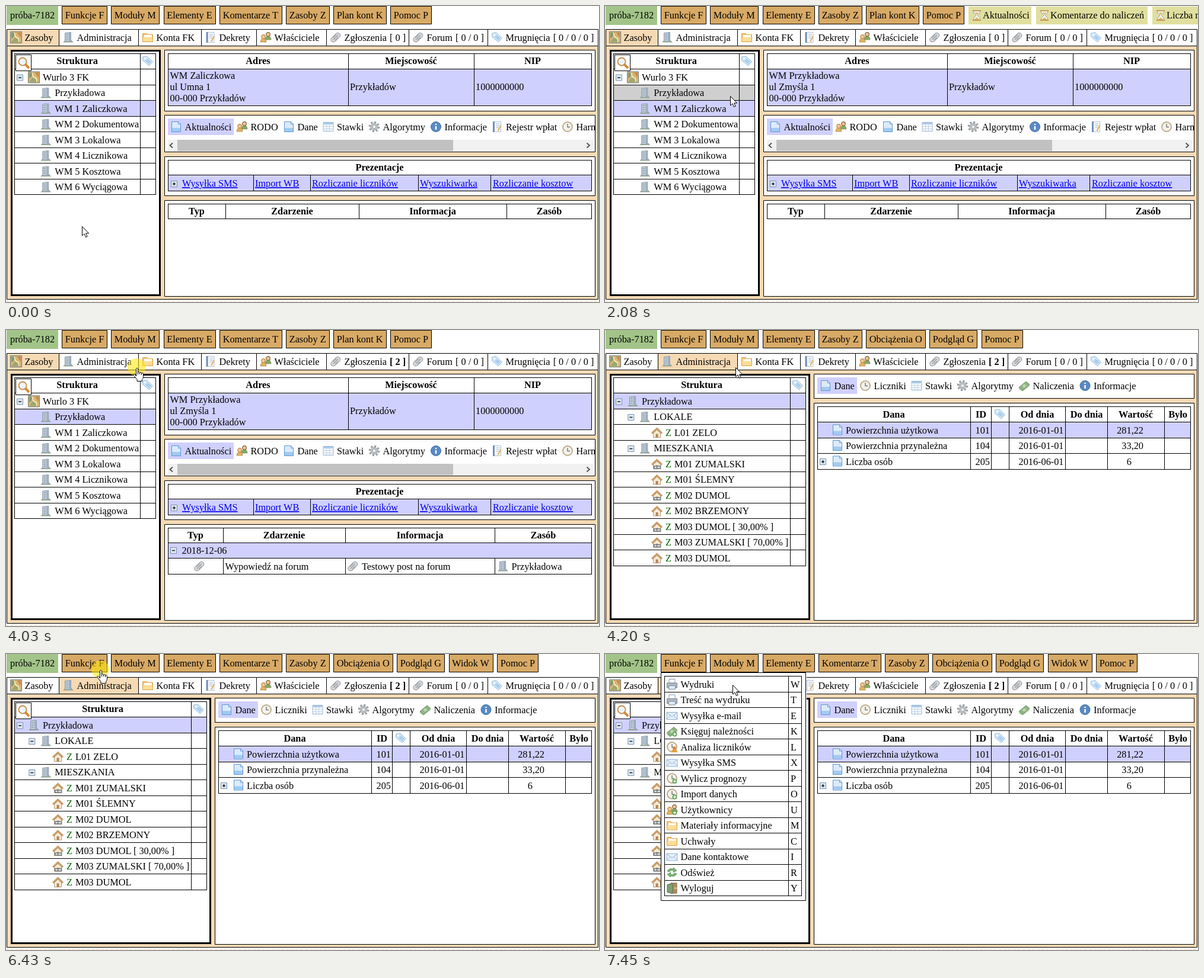
Animation, 1000 px wide and 500 px high, one loop 8 s. Source, as an HTML page:

```html
<!DOCTYPE html>
<html lang="pl">
<head>
<meta charset="utf-8">
<title>Panel</title>
<style>
  html, body { margin: 0; width: 100%; height: 100%; overflow: hidden; background: #fff; }
  svg { display: block; width: 1000px; height: 500px; }
  text { font: 16.3px "Liberation Serif", serif; fill: #000; }
  .b { font-weight: bold; }
  .m { text-anchor: middle; }
  .e { text-anchor: end; }
  .link { fill: #00e; text-decoration: underline; }
  .z { fill: #006400; }
</style>
</head>
<body>
<svg id="stage" viewBox="0 0 1000 500"></svg>
<script>
const LOOP = 8000, WHEAT = '#f5dab5', LILAC = '#d0d0ff', INK = '#000';

// Drawing helpers
const path = (d, fill = 'none', stroke = 'none', w = 1) =>
  `<path d="${d}" fill="${fill}" stroke="${stroke}" stroke-width="${w}"/>`;
const dot = (x, y, r, fill, stroke = 'none', w = 1) =>
  `<circle cx="${x}" cy="${y}" r="${r}" fill="${fill}" stroke="${stroke}" stroke-width="${w}"/>`;
const fillBox = (x0, y0, x1, y1, fill) => path(`M${x0} ${y0}H${x1}V${y1}H${x0}z`, fill);
const box = (x0, y0, x1, y1, fill = '#fff', w = 1) =>
  path(`M${x0 + w / 2} ${y0 + w / 2}H${x1 + 1 - w / 2}V${y1 + 1 - w / 2}H${x0 + w / 2}z`, fill, INK, w);
const text = (x, y, s, cls = '') => `<text x="${x}" y="${y}" class="${cls}">${s}</text>`;
const head = (x, y, s) => text(x, y, s, 'b m');
const place = (x, y, s) => `<g transform="translate(${x} ${y})">${s}</g>`;
const icon = (name, x, y) => place(x, y, icons[name]);
const grid = (xs, ys) => {
  const X = xs.map(v => Math.floor(v) + .5), Y = ys.map(v => Math.floor(v) + .5);
  const [l, r, t, b] = [X[0], X.at(-1), Y[0], Y.at(-1)];
  return path(Y.map(y => `M${l - .5} ${y}H${r + .5}`).join('') + X.map(x => `M${x} ${t}V${b}`).join(''), 'none', INK);
};
const rowTop = (i, top = 80) => top + 26.5 * i;
const rowTops = (n, top) => Array.from({ length: n + 1 }, (_, i) => rowTop(i, top));
const base = top => Math.floor(top + 19.5);

// Icons, 20 by 20
const lines = (d, c, w) => path(d, 'none', c, w);
const plusBadge = dot(14.5, 15, 4, '#5fa655') + lines('M12 15h5M14.500 12.500v5', '#fff', 1.5);
const person = (x, y, hair, body) => place(x, y,
  path('M0 13Q0 7 5 7T10 13z', body, '#8a7448', .6) + dot(5, 4, 3.3, '#efc995', hair, 1.2));
const expander = d => path('M.5 .5h10v10h-10z', '#dfe8f0', '#7893ac') + lines(d, '#123', 1.5);
const icons = {
  map: path('M.500 .500h19v19H.500z', '#d9b573', '#6b7a80') + path('M2 2h6L6 9l-4 3z', '#7f9b78') +
    path('M12 2h6v9z', '#c9884f') + path('M2 18l6-8 4 2 6 6z', '#9aa873') + lines('M7 2l2 7 5 3 1 6', '#fff1c8', 1.5),
  building: path('M1 18.500l4-4h10l4 4z', '#94a98c') + path('M4.500 2.500l10-1V17h-10z', '#c6d1db', '#8595a5') +
    path('M11 2l3.500-.500V17H11z', '#9fb0c0') + lines('M6 5h4M6 8h4M6 11h4M6 14h4', '#7d92a8', 1.2),
  folder: path('M1.500 3.500h7l2 2h8v12h-17z', '#f6c470', '#dca04e') + path('M4 6h13v4H4z', '#fff') +
    path('M2 17V9.500h16V17z', '#fddd96'),
  ledger: path('M5 1.500h11v17H5z', '#f7f9fb', '#b4c2d0') + path('M2.500 1h3v18h-3z', '#6f8fba') +
    lines('M8 5h6M8 8h6M8 11h5', '#a9b8c8') + lines('M16 8l-5 9', '#e2b05a', 2),
  people: person(9, 1, '#7d6140', '#82ab66') + person(1, 5, '#c08a45', '#e4b25a'),
  clip: path('M2 12l9-9q3-2 6 1 2 3 0 5l-8 8q-3 2-6 0-2-2-1-5z', '#d6d8da', '#93979b') +
    lines('M6 14l8-8M5 11l6-6M9 15l5-5', '#989da1', 1.2),
  tag: path('M1.500 3l7-1.500 10 9.500-6 7-11-9z', '#cde4f7', '#9cc2de') + dot(5.5, 5.5, 1.5, '#fff') +
    lines('M7 9l6 5M9 7l6 5', '#8ab7de', 1.2),
  page: path('M2.500 1.500h11l4 4v13h-15z', '#dceafb', '#5b98d4') + path('M3 12h14v6H3z', '#a3caf2') +
    path('M13.500 1.500v4h4z', '#fff', '#5b98d4'),
  sheet: path('M1.500 2.500h17v15h-17z', '#f5f9fd', '#98b5d1') + path('M2 3h16v3H2z', '#a9caea') +
    lines('M2 9.500h16M2 13.500h16M7 6v11M12 6v11', '#c2d3e3'),
  gear: dot(10, 10, 6, '#bfc4c7', '#999fa3') +
    `<circle cx="10" cy="10" r="7.800" fill="none" stroke="#999fa3" stroke-width="3" stroke-dasharray="3.060"/>` +
    dot(10, 10, 2.8, '#fff', '#999fa3'),
  info: dot(10, 10, 8.5, '#5a8ac4', '#41709f') + lines('M10 9v6M10 5v2', '#fff', 2.4),
  clock: dot(10, 10, 8, '#f3f2ec', '#bfae88', 2) + lines('M10 5v5.500h4', '#777', 1.4),
  money: path('M1 13L13 3l6 5L7 18z', '#8fb584', '#658e60') + dot(10, 10.5, 2.8, '#b9d6ad') + lines('M1 15l6 4 12-9', '#7ba373'),
  house: path('M4 9l6-6 6 6v9H4z', '#f6ead6', '#b39670') + path('M1 10l9-8.500L19 10l-2 1.500-7-6.500-7 6.500z', '#d3a26a', '#a67c4b', .8) +
    path('M8 12h4v6H8z', '#ad8659'),
  printer: path('M5 1.500h10V8H5z', '#fff', '#8b9bab') + path('M1.500 8h17v8h-17z', '#aeb9c4', '#76848f') +
    path('M4.500 12.500h11v6h-11z', '#ddebf7', '#788a9b'),
  mail: path('M1 4.500h18v12H1z', '#e4f0fb', '#8fb0d2') + lines('M1 5l9 7 9-7M1 16l6-6M19 16l-6-6', '#8fb0d2'),
  refresh: path('M2 8q3-6 10-4l1-2 5 5-6 3 .500-3Q8 5 6 9z', '#7ab36f', '#56905a', .7) +
    path('M18 12q-3 6-10 4l-1 2-5-5 6-3-.500 3Q12 15 14 11z', '#7ab36f', '#56905a', .7),
  door: path('M8 1.500h10v17H8z', '#b58a5b', '#7d6340') + path('M2 4l9-2v17l-9-2z', '#7f9f73', '#52704c') + lines('M13 10h5', '#d9c38c', 2),
  hourglass: path('M4 2h12l-1 4-4 4 4 4 1 4H4l1-4 4-4-4-4z', '#f5f8fa', '#8fa0ac') +
    path('M6 5h8l-4 4zM5 17l5-4 5 4z', '#e0b864') + lines('M3 2h14M3 18h14', '#c59a5a', 2),
  check: dot(10, 10, 8, '#dff0dc', '#78b074', 1.8) + lines('M5.500 10l3.500 3.500L15 6', '#58a454', 2.4),
  lens: lines('M13 13l7 7', '#d78a33', 4) + dot(9, 9, 6.5, '#eef6fc', '#c98a45', 1.8),
  plus: expander('M3 5.500h5M5.500 3v5'),
  minus: expander('M3 5.500h5')
};
icons.houseLink = icons.house + path('M5 13.500h5v4H5zM10 13.500h6v4h-6z', '#e2e5e6', '#737a7d', 1.6);
icons.moneyAdd = icons.money + plusBadge;
icons.clockAdd = icons.clock + plusBadge;
icons.clockUser = icons.clock + place(9, 8, path('M0 11q0-5 5-5t5 5z', '#e0a43d') + dot(5, 4, 2.8, '#d98540'));
icons.peopleAdd = icons.people + plusBadge;

// Layers: visible while from <= t < to
const layers = [];
const show = (from, to, ...parts) => layers.push({ from, to, markup: parts.join('') });

const tabs = [
  ['map', 'Zasoby', 1], ['building', 'Administracja', 89], ['folder', 'Konta FK', 223], ['ledger', 'Dekrety', 329],
  ['people', 'Właściciele', 422], ['clip', 'Zgłoszenia', 540], ['clip', 'Forum', 679, '[ 0 / 0 ]'], ['tag', 'Mrugnięcia', 812, '[ 0 / 0 / 0 ]']
];
const frame = active => box(1, 67, 998, 495, WHEAT) + tabs.map(([ic, label, x, count], i) =>
  box(x, 39, tabs[i + 1]?.[2] ?? 998, 67, i === active ? WHEAT : '#fff') + icon(ic, x + 6, 43) +
  text(x + 30.5, 59, label + (count ? ` <tspan dx="1">${count}</tspan>` : ''))).join('');
const reports = (count, cls) => text(647, 59, count, cls);

const buttonWidth = {
  'Funkcje F': 75.5, 'Moduły M': 81, 'Elementy E': 87, 'Komentarze T': 104.5, 'Zasoby Z': 72.5, 'Plan kont K': 88.5,
  'Obciążenia O': 99.5, 'Podgląd G': 80, 'Widok W': 74, 'Pomoc P': 69
};
const topMenu = (...names) => {
  let x = 94.5;
  return fillBox(1, 0, 88, 32, '#a2c488') + text(7, 21, 'próba-7182') +
    ['Funkcje F', 'Moduły M', 'Elementy E', ...names, 'Pomoc P'].map(name => {
      const left = x, right = x + buttonWidth[name];
      x = right + 7.5;
      return box(Math.floor(left), 0, Math.floor(right), 30, '#d8aa66') + text(left + 5.2, 21, name);
    }).join('');
};
const tasks = (x, ic, color) => [['Aktualności', 106], ['Komentarze do naliczeń', 188], ['Liczba notatek', 130]].map(([label, w]) => {
  const left = x;
  x += w + 8;
  return fillBox(left, 1, left + w, 31, color) + icon(ic, left + 4, 6) + text(left + 24, 21, label);
}).join('');

const tree = (right, rows) => {
  const split = right - 26;
  return head((14 + split) / 2, 98, 'Struktura') + icon('tag', split + 3, 83) +
    grid([14, split, right], rowTops(rows.length + 1)) +
    rows.map(([level, ic, label, open], i) => {
      const top = rowTop(i + 1), x = 37 + 20.3 * level, y = base(top);
      return (open ? icon('minus', x - 19, top + 9) : '') + icon(ic, x, top + 4) +
        (level === 2 ? text(102, y, 'Z', 'z') + text(117, y, label) : text(x + 25, y, label));
    }).join('');
};
const strip = (items, y) => items.map(([ic, label, x]) => icon(ic, x, y) + text(x + 24.5, y + 16, label)).join('');
const rowFill = (i, color, right = 252) => fillBox(15, rowTop(i), right, rowTop(i + 1), color);
const search = box(16, 82, 42, 109) + icon('lens', 19, 85);

// Resources view
const SWAP = 2170, ADMIN = 4200;
show(0, ADMIN, frame(0), box(8, 74, 260, 489, '#fff', 3),
  box(267, 74, 993, 177), box(267, 184, 993, 246), box(267, 254, 993, 320), box(267, 328, 993, 490));
show(0, SWAP, rowFill(3, LILAC));
show(1840, SWAP, rowFill(2, '#cfcfcf'));
show(SWAP, ADMIN, rowFill(2, LILAC));
show(0, ADMIN, tree(252, [
  [0, 'map', 'Wurlo 3 FK', true],
  ...['Przykładowa', 'WM 1 Zaliczkowa', 'WM 2 Dokumentowa', 'WM 3 Lokalowa', 'WM 4 Licznikowa', 'WM 5 Kosztowa', 'WM 6 Wyciągowa']
    .map(label => [1, 'building', label])
]), search,
  fillBox(274, 107, 988, 168, LILAC), grid([273, 577, 789, 987], [80, 106, 168]),
  head(425, 98, 'Adres'), head(683, 98, 'Miejscowość'), head(888, 98, 'NIP'),
  text(580, 142, 'Przykładów'), text(792, 142, '1000000000'),
  fillBox(273, 190, 384, 218, LILAC),
  `<clipPath id="stripClip"><path d="M268 185H993V246H268z"/></clipPath><g clip-path="url(#stripClip)">`,
  strip([['page', 'Aktualności', 277], ['people', 'RODO', 388], ['page', 'Dane', 467], ['sheet', 'Stawki', 533.5], ['gear', 'Algorytmy', 611],
    ['info', 'Informacje', 715], ['ledger', 'Rejestr wpłat', 818.5], ['clock', 'Harmonogram', 937]], 194), '</g>',
  fillBox(273, 226, 990, 245, '#f1f1f1'), fillBox(289, 226, 754, 245, '#c1c1c1'),
  lines('M281 231.500l-4.500 4 4.500 4M979.500 231.500l4.500 4-4.500 4', '#505050', 1.8),
  fillBox(274, 286, 988, 312, LILAC), grid([273, 987], [260, 285]), grid([273, 417, 513, 695, 817, 987], [285, 312]),
  head(630, 278, 'Prezentacje'), icon('plus', 278, 295),
  [['Wysyłka SMS', 297], ['Import WB', 420], ['Rozliczanie liczników', 516], ['Wyszukiwarka', 698], ['Rozliczanie kosztow', 821]]
    .map(([label, x]) => text(x, 305, label, 'link')).join(''));

const address = (name, street) => [name, street, '00-000 Przykładów'].map((s, i) => text(276.5, 123 + 19 * i, s)).join('');
show(0, 1930, address('WM Zaliczkowa', 'ul Umna 1'));
show(1930, ADMIN, address('WM Przykładowa', 'ul Zmyśla 1'));

const eventHeads = (a, b, c) => grid([273, a, b, c, 987], [334, 359]) +
  ['Typ', 'Zdarzenie', 'Informacja', 'Zasób'].map((s, i) => {
    const xs = [273, a, b, c, 988];
    return head((xs[i] + xs[i + 1]) / 2, 352, s);
  }).join('');
show(0, SWAP, eventHeads(370, 595, 844));
show(SWAP, ADMIN, fillBox(274, 360, 988, 385, LILAC), eventHeads(366, 572, 824), grid([273, 987], [359, 385]),
  grid([273, 366, 572, 824, 987], [385, 412]), icon('minus', 277, 367), text(296.5, 378, '2018-12-06'),
  icon('clip', 316, 389), text(369.5, 405, 'Wypowiedź na forum'), icon('clip', 575, 389),
  text(600, 405, 'Testowy post na forum'), icon('building', 828, 389), text(852.5, 405, 'Przykładowa'));

// Administration view
show(ADMIN, LOOP, frame(1), box(8, 74, 345, 489, '#fff', 3), box(352, 74, 993, 115), box(352, 123, 993, 490),
  rowFill(1, LILAC, 338), tree(338, [
    [0, 'building', 'Przykładowa', true], [1, 'building', 'LOKALE', true], [2, 'house', 'L01 ZELO'],
    [1, 'building', 'MIESZKANIA', true], [2, 'houseLink', 'M01 ZUMALSKI'], [2, 'house', 'M01 ŚLEMNY'],
    [2, 'houseLink', 'M02 DUMOL'], [2, 'house', 'M02 BRZEMONY'], [2, 'houseLink', 'M03 DUMOL [ 30,00% ]'],
    [2, 'houseLink', 'M03 ZUMALSKI [ 70,00% ]'], [2, 'house', 'M03 DUMOL']
  ]),
  fillBox(358, 80, 425, 108, LILAC),
  strip([['page', 'Dane', 362], ['clock', 'Liczniki', 429], ['sheet', 'Stawki', 515.5], ['gear', 'Algorytmy', 593],
    ['money', 'Naliczenia', 697], ['info', 'Informacje', 799.5]], 84),
  fillBox(359, 156, 988, 182, LILAC), grid([358, 616, 651, 681, 776, 847, 943, 987], rowTops(4, 129)),
  [['Dana', 487], ['ID', 634], ['Od dnia', 729], ['Do dnia', 812], ['Wartość', 895], ['Było', 966]].map(([s, x]) => head(x, 148, s)).join(''),
  icon('tag', 656, 132), icon('plus', 362, 217),
  [['Powierzchnia użytkowa', 101, '2016-01-01', '281,22'], ['Powierzchnia przynależna', 104, '2016-01-01', '33,20'],
    ['Liczba osób', 205, '2016-06-01', '6']].map(([label, id, date, value], i) => {
    const top = rowTop(i + 1, 129), y = base(top);
    return icon('page', 382, top + 3) + text(406, y, label) + text(624.5, y - .5, id) +
      text(773.5, y - .5, date, 'e') + text(i === 2 ? 888 : 908, y - .5, value, 'e');
  }).join(''));
show(5190, LOOP, search);

show(0, SWAP, reports('[ 0 ]'));
show(SWAP, LOOP, reports('[ 2 ]', 'b'));

// Top bar
const homeMenu = topMenu('Komentarze T', 'Zasoby Z', 'Plan kont K');
show(0, 1930, homeMenu);
show(1930, SWAP, topMenu('Zasoby Z', 'Plan kont K'));
show(2080, SWAP, tasks(613, 'hourglass', '#e0df9f'));
show(SWAP, ADMIN, homeMenu);
show(SWAP, 3650, tasks(725, 'check', '#9fe0a0'));
show(ADMIN, 4430, topMenu('Zasoby Z', 'Obciążenia O', 'Podgląd G'));
show(4430, LOOP, topMenu('Komentarze T', 'Zasoby Z', 'Obciążenia O', 'Podgląd G', 'Widok W'));

const commands = [
  ['printer', 'Wydruki', 'W'], ['printer', 'Treść na wydruku', 'T'], ['mail', 'Wysyłka e-mail', 'E'], ['moneyAdd', 'Księguj należności', 'K'],
  ['clockUser', 'Analiza liczników', 'L'], ['mail', 'Wysyłka SMS', 'X'], ['clockAdd', 'Wylicz prognozy', 'P'], ['clockAdd', 'Import danych', 'O'],
  ['peopleAdd', 'Użytkownicy', 'U'], ['folder', 'Materiały informacyjne', 'M'], ['folder', 'Uchwały', 'C'], ['mail', 'Dane kontaktowe', 'I'],
  ['refresh', 'Odśwież', 'R'], ['door', 'Wyloguj', 'Y']
];
const COMMANDS_TOP = 37.5;
show(6580, LOOP, fillBox(94, 32, 340, 417, '#fff'), box(94, 31, 338, 416),
  grid([100, 309, 331], rowTops(commands.length, COMMANDS_TOP)),
  commands.map(([ic, label, key], i) => {
    const top = rowTop(i, COMMANDS_TOP), y = base(top);
    return icon(ic, 103, top + 3.5) + text(127.5, y, label) + text(313, y, key);
  }).join(''));

// Pointer
const moves = [
  { from: 690, to: 1460, steps: 11, x: 211, y: 152 },
  { from: 2800, to: 3034, steps: 4, x: 227, y: 95 },
  { from: 3111, to: 3500, steps: 6, x: 220, y: 65 },
  { from: 3650, to: 3650, steps: 1, x: 220, y: 63 },
  { from: 5590, to: 5820, steps: 4, x: 159, y: 26 },
  { from: 7060, to: 7450, steps: 6, x: 215, y: 52 }
];
const clicks = [[1610, 1690], [4030, 4200], [6430, 6580]];
const pointerAt = t => {
  let x = 128, y = 372;
  for (const m of moves) {
    if (t < m.from) break;
    const gap = (m.to - m.from) / Math.max(1, m.steps - 1);
    const done = t >= m.to ? 1 : (Math.floor((t - m.from) / gap) + 1) / m.steps;
    const u = done * done * (3 - 2 * done);
    x += (m.x - x) * u;
    y += (m.y - y) * u;
  }
  return { x: Math.round(x), y: Math.round(y) };
};
const isHand = (t, y) => t < 1840 ? y < 318 : t < ADMIN ? y < 67 : t >= 5590 && t < 7060;

const stage = document.getElementById('stage');
stage.innerHTML = lines('M0 498.500H1000', WHEAT).replace('/>', ' stroke-dasharray="5 3"/>') +
  layers.map(l => `<g>${l.markup}</g>`).join('') +
  `<g id="pointer"><g id="click">${dot(0, 0, 15, '#ffe600')}</g>` +
  `<g id="arrow">${path('M.500 .500V16l3.500-3.200 2.500 5.700 2.600-1.200-2.500-5.300h5z', '#fff', INK)}</g>` +
  `<g id="hand">${place(-6, 0, path('M5.500 15V2.500q1.500-3 3 0V8q2-1 3 .800 2-1 3 .800 2.500-.600 3 1.900v5q0 2-2 4v3H7v-3L1 13.500q-.500-3 2.500-1.500z', '#fff', INK) +
    lines('M8.500 8v4M11.500 9v3M14.500 10v3', INK))}</g></g>`;
const groups = [...stage.children].slice(1, layers.length + 1);
const [pointer, click, arrow, hand] = ['pointer', 'click', 'arrow', 'hand'].map(id => document.getElementById(id));
click.setAttribute('opacity', .55);
const toggle = (el, on) => { el.style.display = on ? '' : 'none'; };

function draw() {
  const t = performance.now() % LOOP, { x, y } = pointerAt(t), overLink = isHand(t, y);
  layers.forEach((l, i) => toggle(groups[i], t >= l.from && t < l.to));
  pointer.setAttribute('transform', `translate(${x} ${y})`);
  toggle(click, clicks.some(([a, b]) => t >= a && t < b));
  toggle(hand, overLink);
  toggle(arrow, !overLink);
  requestAnimationFrame(draw);
}
draw();
</script>
</body>
</html>
```
